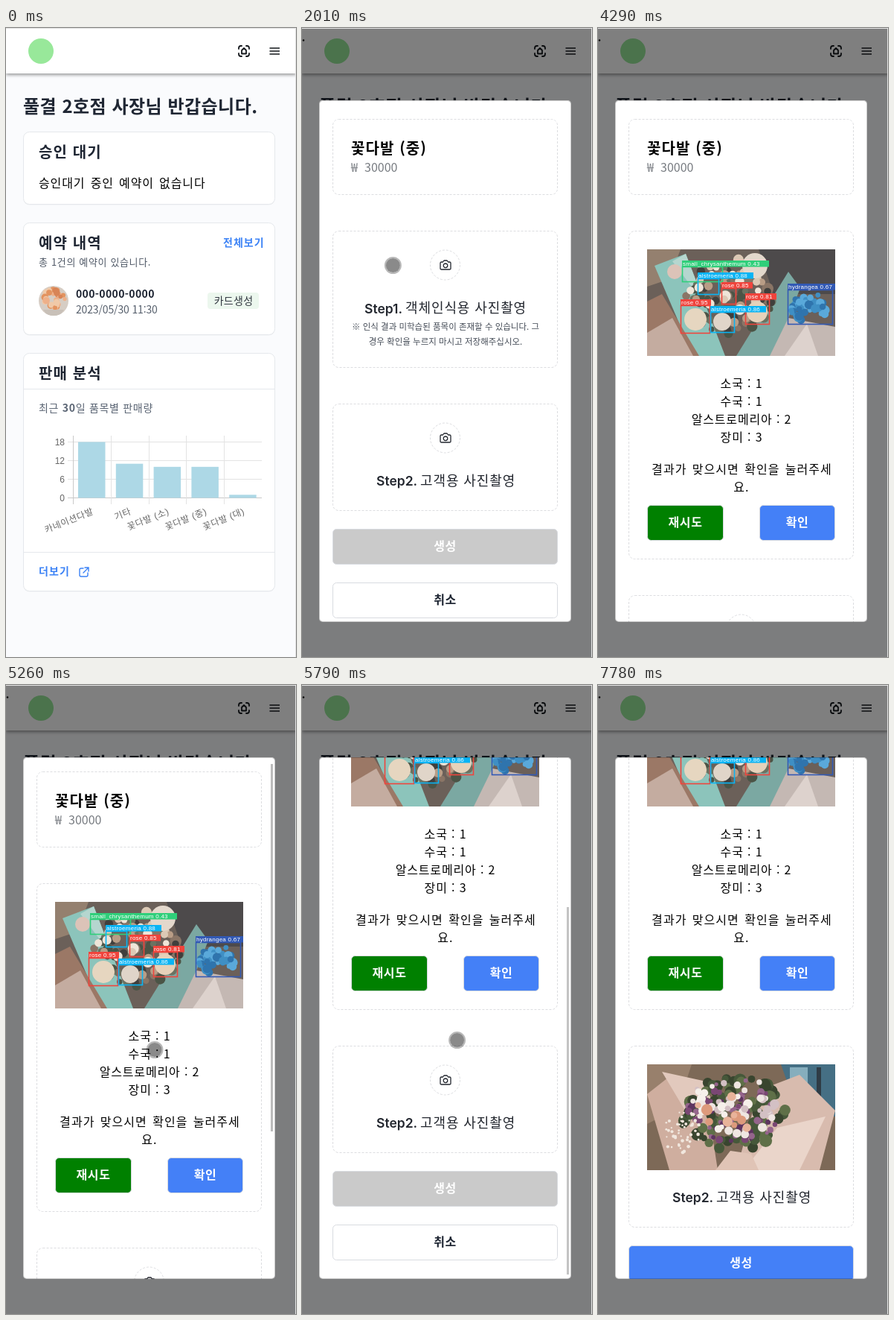
Write an HTML page that moves like this. It is 390 px wide and 844 px high and loops after 8000 ms.

```html
<!DOCTYPE html>
<html lang="ko">
<head>
<meta charset="utf-8">
<style>
html, body { margin: 0; width: 100%; height: 100%; overflow: hidden; background: #fafbfd; }
svg { display: block; }
text { font-family: "Noto Sans CJK KR", "Noto Sans CJK", sans-serif; white-space: pre; }
.b { font-weight: 700; }
.step { font-family: Inter, sans-serif; font-weight: 600; }
.axis { font-family: "Liberation Sans", "Noto Sans CJK KR", sans-serif; }
.tag { font-family: "Liberation Sans", sans-serif; }
.mid { text-anchor: middle; }
.end { text-anchor: end; }
</style>
</head>
<body>
<svg id="stage" width="390" height="844" viewBox="0 0 390 844"></svg>
<script>
const LOOP = 8000, BLUE = '#4480f7', LINK = '#3b82f6', INK = '#1f2633';

// Markup helpers
const text = (x, y, size, str, attrs = '') =>
  `<text x="${x}" y="${y}" font-size="${size}" ${attrs}>${str}</text>`;
const rect = (x, y, w, h, fill, attrs = '') =>
  `<rect x="${x}" y="${y}" width="${w}" height="${h}" fill="${fill}" ${attrs}/>`;
const disc = (x, y, r, fill, attrs = '') =>
  `<circle cx="${x}" cy="${y}" r="${r}" fill="${fill}" ${attrs}/>`;
const path = (d, fill, attrs = '') => `<path d="${d}" fill="${fill}" ${attrs}/>`;
const group = (id, body) => `<g id="${id}">${body}</g>`;
const card = (y, h) =>
  rect(23.5, y + 1.5, 338, h, 'rgba(0,0,0,.05)', 'rx="8"') +
  rect(23.5, y + .5, 338, h, '#fff', 'rx="8" stroke="#e5e8ec"');
const DASH = 'stroke="#dcdde0" stroke-dasharray="3 2"';
const dashed = (y, h, attrs = '') => rect(41.5, y + .5, 302, h, 'none', `rx="8" ${DASH} ${attrs}`);
const heading = (y, str) => text(44, y, 20, str, `class="b" fill="${INK}" letter-spacing="1.1"`);
const camera = y => disc(192.5, y, 20, 'none', DASH) +
  `<g transform="translate(193 ${y})" fill="none" stroke="#22262e" stroke-width="1.3" stroke-linejoin="round">
  <path d="M-5.5-4h2l1.4-2h4.2l1.4 2h2q1.5 0 1.5 1.5v7q0 1.5-1.5 1.5h-11q-1.5 0-1.5-1.5v-7q0-1.5 1.5-1.5z"/>
  <circle cy=".8" r="2.8"/></g>`;
const button = (x, y, w, fill, str, ink = '#fff', attrs = '') =>
  rect(x + .5, y + .5, w - 1, 47, fill, `rx="5" stroke="#d8dbe0" ${attrs}`) +
  text(x + w / 2, y + 29, 16, str, `class="b mid" fill="${ink}" letter-spacing=".6"`);

// Seeded flower blobs inside an ellipse
function blobs(seed, n, cx, cy, rx, ry, r, colors) {
  const rnd = () => (seed = (seed * 16807) % 2147483647) / 2147483647;
  rnd();
  let out = '';
  for (let i = 0; i < n; i++) {
    const a = rnd() * 6.283, d = Math.sqrt(rnd());
    out += disc((cx + rx * d * Math.cos(a)).toFixed(1), (cy + ry * d * Math.sin(a)).toFixed(1),
      (r * (.6 + rnd() * .7)).toFixed(1), colors[i % colors.length]);
  }
  return out;
}

// Label x, y, width; box width, height
const tag = (x, y, lw, w, h, color, str) =>
  rect(x + .5, y + 8.5, w, h, 'none', `stroke="${color}" stroke-width="1.6"`) +
  rect(x, y, lw, 8.5, color) +
  text(x + 1, y + 7, 8, str, 'class="tag" fill="#fff" letter-spacing=".25"');

const detected = `<svg x="66" y="297" width="253" height="143">` +
  rect(0, 0, 253, 143, '#6b6059') +
  path('M0 0H45L30 40 0 50z', '#94806f') +
  path('M150 0H253V60H170z', '#4d4a4b') +
  path('M10 22L52 6 105 143H62z', '#8cc4bb') +
  path('M34 16L52 6 78 74z', '#b5d6cf') +
  path('M120 143L190 30 206 52 170 143z', '#7ba8a2') +
  path('M0 70L20 60 70 143H0z', '#9b7866') +
  path('M0 112L34 92 62 143H0z', '#c4aca0') +
  path('M165 143L190 92 253 104V143z', '#c4b8b3') +
  path('M185 143L215 100 230 143z', '#ddd2cd') +
  disc(37, 30, 10, '#dcc3b8') +
  blobs(11, 60, 112, 66, 62, 48, 6, ['#4b5446', '#6b7261', '#403f3c', '#8a7566']) +
  blobs(5, 30, 112, 56, 56, 44, 6, ['#dcc9b5', '#b99d86', '#efe5d8']) +
  disc(65, 94, 15, '#e6d6c0') + disc(101, 97, 12, '#e0d5c9') + disc(148, 84, 14, '#e6d2ba') +
  disc(145, 22, 17, '#e3d8cc') +
  blobs(23, 40, 219, 78, 26, 19, 5, ['#3f8fc4', '#5aa9da', '#2f74ad']) +
  tag(47, 15, 117, 54, 20, '#2fcf7a', 'small_chrysanthemum 0.43') +
  tag(68, 31, 75, 28, 21, '#08b4f5', 'alstroemeria 0.88') +
  tag(100, 44, 42, 19, 21, '#f0443c', 'rose 0.85') +
  tag(132, 59, 42, 32, 33, '#f0443c', 'rose 0.81') +
  tag(45, 67, 41, 39, 37, '#f0443c', 'rose 0.95') +
  tag(85, 76, 75, 32, 27, '#08b4f5', 'alstroemeria 0.86') +
  tag(189, 46, 64, 60, 46, '#3259b4', 'hydrangea 0.67') + '</svg>';

const bouquet = `<svg id="bouquet" x="66" y="25" width="253" height="142">` +
  rect(0, 0, 253, 142, '#7d6957') +
  path('M0 0H60L40 60 0 80z', '#98806c') +
  path('M180 0H253V70H205z', '#456f84') +
  rect(192, 4, 24, 34, '#86aebd') + rect(228, 4, 6, 60, '#2f3c46') +
  path('M0 40L28 18 80 45 95 142H30z', '#cfae9f') +
  path('M20 10L75 22 90 55 50 60z', '#e2c9bd') +
  path('M150 35L205 14 253 62 232 142H120z', '#d8bbae') +
  path('M175 85L240 70 205 142H130z', '#ead5ca') +
  blobs(7, 90, 116, 66, 70, 50, 7, ['#46583a', '#5f7048', '#39452f']) +
  blobs(31, 70, 116, 62, 64, 44, 4, ['#7a4774', '#5e3560', '#95658c']) +
  blobs(17, 55, 116, 54, 60, 42, 5, ['#efe6e2', '#d3c0c4', '#f6f0ea']) +
  blobs(3, 10, 108, 68, 60, 28, 6, ['#dd9a7c', '#e8b39a']) +
  blobs(41, 50, 48, 92, 26, 30, 1.8, ['#f1e7de']) +
  path('M92 142L112 116 140 120 150 142z', '#e0c4b6') + '</svg>';

function chart() {
  const names = ['카네이션다발', '기타', '꽃다발 (소)', '꽃다발 (중)', '꽃다발 (대)'];
  let out = '';
  for (let i = 0; i < 4; i++) {
    const y = 630.5 - 25 * i;
    out += path(`M83 ${y}H344`, 'none', `stroke="${i ? '#e3e3e3' : '#c9c9c9'}"`) +
      text(79, y + 4, 12, i * 6, 'class="axis end" fill="#666"');
  }
  [18, 11, 10, 10, 1].forEach((v, i) => {
    const x = 90 + i * 50.8, h = v * 25 / 6;
    out += path(`M${Math.round(x) + .5} 547V639`, 'none', `stroke="${i ? '#e3e3e3' : '#c9c9c9'}"`) +
      rect(x + 7, 630.5 - h, 36.5, h, '#add8e6') +
      text(0, 4, 12, names[i], `class="axis end" fill="#666" letter-spacing=".55"
        transform="translate(${x + 27} 648) rotate(-22)"`);
  });
  return out;
}

const home =
  rect(0, 0, 390, 844, '#fafbfd') +
  rect(0, 0, 390, 61, '#fff', 'style="filter:drop-shadow(0 2px 2px rgba(0,0,0,.4))"') +
  disc(47, 31, 17, '#98e89a') +
  `<g fill="none" stroke="#15181d" stroke-width="1.8" stroke-linecap="round" stroke-linejoin="round">
  <path d="M313 28v-1q0-3 3-3h1M323 24h1q3 0 3 3v1M327 34v1q0 3-3 3h-1M317 38h-1q-3 0-3-3v-1"/>
  <path d="M317 30l3-3 3 3v4.5h-6z"/>
  <path d="M354.5 27H368M354.5 31H368M354.5 35H368" stroke-width="1.6" stroke-linecap="butt"/></g>` +
  text(23, 114, 24, '풀결 2호점 사장님 반갑습니다.', `class="b" fill="${INK}" letter-spacing=".5"`) +
  card(139, 97) + heading(174, '승인 대기') +
  text(44, 214, 16, '승인대기 중인 예약이 없습니다', 'letter-spacing=".9" word-spacing="1.8"') +
  card(261, 150) + heading(296, '예약 내역') +
  text(292, 293, 14, '전체보기', `class="b" fill="${LINK}" letter-spacing="1"`) +
  text(44, 319, 13, '총 1건의 예약이 있습니다.', 'fill="#4f5866" letter-spacing=".65"') +
  '<clipPath id="round"><circle cx="64" cy="366" r="20"/></clipPath><g clip-path="url(#round)">' +
  rect(44, 346, 40, 40, '#d6cdc4') +
  blobs(9, 30, 64, 364, 15, 13, 4, ['#e3935f', '#eeb089', '#d88456', '#f0c9a8']) +
  path('M50 378H78L72 386H56z', '#c8c0b8') + '</g>' +
  text(94, 362, 14, '000-0000-0000', 'class="b" fill="#1b2230" letter-spacing=".35"') +
  text(94, 383, 14, '2023/05/30 11:30', 'fill="#565f6c" letter-spacing="-.15"') +
  rect(271, 355, 69, 22, '#ecf7ee', 'rx="4"') +
  text(306, 371, 14, '카드생성', 'class="mid" fill="#30363f" letter-spacing=".3"') +
  card(436, 319) + heading(471, '판매 분석') +
  path('M24 484.5H361M24 703.5H361', 'none', 'stroke="#e5e8ec"') +
  text(44, 515, 14, '최근 <tspan class="b">30</tspan>일 품목별 판매량', 'fill="#5a6473" letter-spacing=".7"') +
  chart() +
  text(44, 734, 14, '더보기', `class="b" fill="${LINK}" letter-spacing="1.1"`) +
  path('M104 725h-3q-2 0-2 2v7q0 2 2 2h7q2 0 2-2v-3M106 724h5v5M111 724l-7 7', 'none',
    `stroke="${LINK}" stroke-width="1.4" stroke-linecap="round"`);

const results = ['소국 : 1', '수국 : 1', '알스트로메리아 : 2', '장미 : 3'];
const BODY = 'class="mid" letter-spacing=';
const NOTE = 'class="mid" fill="#454c57"';

const modal =
  rect(0, 1, 389, 843, 'rgba(0,0,0,.5)') + disc(2, 16.5, 1.2, '#000') +
  '<clipPath id="clip"><rect id="hole" x="23" y="97" width="339" height="700" rx="5"/></clipPath>' +
  '<g clip-path="url(#clip)">' + rect(23, 97, 339, 700, '#fff') +
  group('scroll',
    dashed(122, 101) +
    text(66, 169, 20, '꽃다발 (중)', 'class="b" letter-spacing="1.1"') +
    text(66, 193, 16, '₩', 'fill="#777b80"') + text(84, 193, 16, '30000', 'fill="#777b80"') +
    group('idle',
      dashed(272, 183) + camera(318) +
      text(84, 383, 17.5, 'Step1.', 'class="step" fill="#22262e"') +
      text(139, 382, 18, '객체인식용 사진촬영', 'fill="#22262e" letter-spacing=".9"') +
      text(193, 405, 11.5, '※ 인식 결과 미학습된 품목이 존재할 수 있습니다. 그', NOTE) +
      text(193, 425, 11.5, '경우 확인을 누르지 마시고 저장해주십시오.', NOTE)) +
    group('result',
      dashed(272, 440) + detected +
      results.map((s, i) => text(193, 482.5 + 24 * i, 16, s, BODY + '".85"')).join('') +
      text(193.5, 598, 16, '결과가 맞으시면 확인을 눌러주세', BODY + '"1.05" word-spacing="1.8"') +
      text(193, 622, 16, '요.', BODY + '"1.05"') +
      button(66, 640, 103, '#008000', '재시도') + button(217, 640, 102, BLUE, '확인')) +
    group('second',
      dashed(0, 143, 'id="frame"') + group('cam', camera(46)) + bouquet +
      group('label',
        text(100, 110, 17.5, 'Step2.', 'class="step" fill="#22262e"') +
        text(159, 110, 18, '고객용 사진촬영', 'fill="#22262e" letter-spacing=".9"'))) +
    group('make', button(41, 0, 303, '#cacaca', '생성', '#fff', 'id="makeFace"')) +
    group('cancel', button(41, 0, 303, '#fff', '취소', INK))) +
  rect(356, 102, 3, 493, '#bcbcbc', 'id="bar"') + '</g>' +
  rect(23.5, 97.5, 338, 699, 'none', 'id="edge" rx="4.5" stroke="rgba(0,0,0,.2)"');

const cursor = disc(0, 0, 9.5, 'rgba(0,0,0,.46)') +
  disc(0, 0, 10.5, 'none', 'stroke="rgba(0,0,0,.28)" stroke-width="2"');

document.getElementById('stage').innerHTML = home + group('modal', modal) +
  path('M0 .5H389.5V844', 'none', 'stroke="#e2e2e2"') + group('cursor', cursor);

// Pointer strokes: time, x, y
const strokes = [
  [[50, 340, 691], [110, 336, 560], [180, 328, 420], [270, 318, 321], [370, 312, 350], [510, 312, 350],
   [740, 312, 365.5], [1150, 312, 365.5], [1640, 238, 318.5], [1930, 238, 318.5], [2040, 79, 318.5], [2060, 79, 318.5]],
  [[3710, 123, 88], [3770, 123, 88], [4290, 390, 210]],
  [[4930, 300, 600], [5220, 200, 489.5], [5760, 200, 489.5], [5990, 266, 390], [6040, 266, 390],
   [6190, 141, 550], [6390, 141, 550], [6540, 211, 537], [6560, 211, 537]]
];
const clamp = v => Math.max(0, Math.min(1, v));
const $ = id => document.getElementById(id);
const show = (id, on) => $(id).style.display = on ? '' : 'none';
const move = (id, x, y) => $(id).setAttribute('transform', `translate(${x} ${y})`);

function pointer(t) {
  const s = strokes.find(k => t >= k[0][0] && t < k[k.length - 1][0]);
  show('cursor', s);
  if (!s) return;
  const i = s.findIndex(k => k[0] > t), [t0, x0, y0] = s[i - 1], [t1, x1, y1] = s[i];
  const p = (t - t0) / (t1 - t0);
  move('cursor', x0 + (x1 - x0) * p, y0 + (y1 - y0) * p);
}

function draw(t) {
  const found = t >= 4130, photo = t >= 7780, full = t >= 1110;
  show('modal', t >= 890);
  $('modal').setAttribute('opacity', clamp((t - 850) / 150));
  $('hole').setAttribute('height', full ? 700 : 648);
  $('edge').setAttribute('height', full ? 699 : 647);

  const ease = (1 - Math.cos(Math.PI * clamp((t - 5229) / 325))) / 2;
  const offset = Math.floor(277 * ease);
  move('scroll', 0, -offset);
  $('bar').setAttribute('y', Math.round(101.8 + offset * .7097));
  $('bar').setAttribute('opacity', t < 5229 ? 0 : 1 - clamp((t - 5760) / 230));

  show('idle', !found);
  show('result', found);
  const top = found ? 761 : 504, extra = photo ? 100 : 0;
  move('second', 0, top);
  $('frame').setAttribute('height', 143 + extra);
  show('cam', !photo);
  show('bouquet', photo);
  move('label', 0, extra);
  show('make', full);
  $('makeFace').setAttribute('fill', t >= 6040 ? BLUE : '#cacaca');
  move('make', 0, top + 168 + extra);
  move('cancel', 0, top + (full ? 240 : 168) + extra);
  pointer(t);
}

// The clock advances in 10 ms steps
function tick() {
  draw(Math.floor(performance.now() % LOOP / 10) * 10);
  requestAnimationFrame(tick);
}
tick();
</script>
</body>
</html>
```
